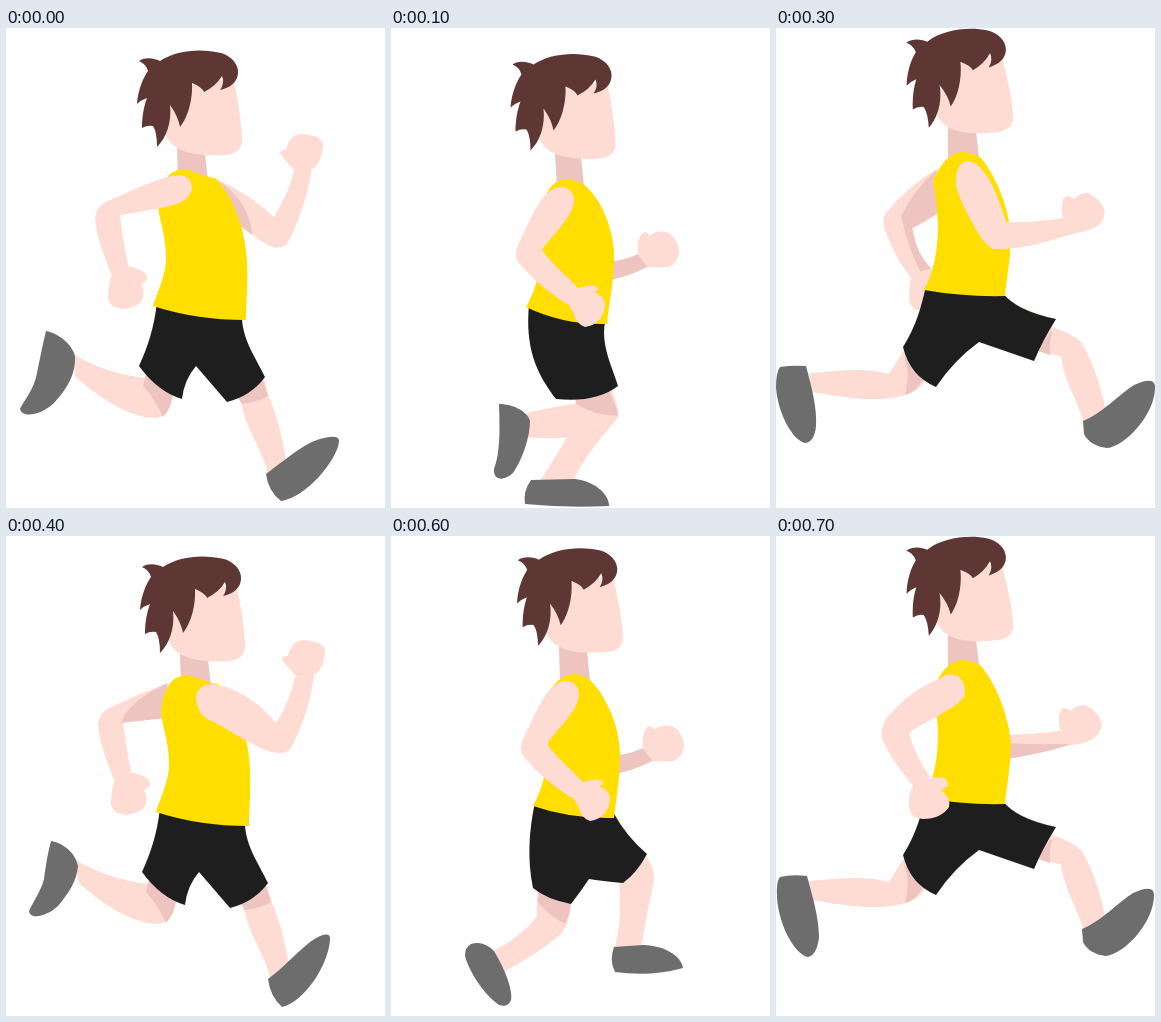
An HTML page that plays this animation: 379 by 480 pixels, repeating every 800 ms.

```html
<!DOCTYPE html>
<html lang="en">
<head>
<meta charset="utf-8">
<title>Runner</title>
<style>
html, body { margin: 0; width: 100%; height: 100%; overflow: hidden; background: #fff; }
svg { display: block; width: 100%; height: 100%; }
</style>
</head>
<body>
<svg id="stage" viewBox="0 0 379 480"></svg>
<script>
const SKIN = '#ffdcd3', SHADE = '#edc4bf', HAIR = '#5e3735',
      SHIRT = '#ffde00', SHORTS = '#1e1e1e', SHOE = '#6d6d6d';

const fill = (color, ...paths) => paths.map(d => `<path fill="${color}" d="${d}"/>`).join('');
const move = (x, y, parts, turn = 0) =>
  `<g transform="translate(${x} ${y}) rotate(${turn} 184 76)">${parts}</g>`;

const head =
  fill(SKIN, 'M164 60L160 108Q166 118 173 121Q188 129 220 127Q237 125 236 110Q235 85 227 50Z') +
  fill(HAIR, 'M133 33C140 28 150 31 154 33C170 22 195 20 215 25C228 29 235 40 231 50C228 57 222 60 214 62Q219 55 216 48Q210 58 198 64Q196 59 186 55C187 75 180 92 174 99Q172 88 164 77C166 95 160 110 151 119Q151 104 147 98Q141 97 136 100C136 88 138 78 141 70Q135 72 131 76C132 62 137 50 142 43Q140 36 133 33Z');

// The four steps of the stride: contact, passing, push-off, flight
const torsos = [
  fill(SHADE, 'M171 119L199 126L202 152L172 150Z') +
  fill(SHIRT, 'M163 147Q172 139 183 142Q200 149 209 150C225 165 240 200 241 235C242 260 240 275 240 292Q190 292 147 278C155 255 160 245 160 230C160 205 152 190 152 175Q154 158 163 147Z'),

  fill(SHADE, 'M164 125L190 129L193 158L166 160Z') +
  fill(SHIRT, 'M153 174Q158 151 178 151L191 155C205 165 220 190 223 222C224 250 218 275 216 296Q172 297 135 279C146 260 150 240 151 220Q152 190 153 174Z'),

  fill(SHADE, 'M168 110L196 115L199 145L169 146Z') +
  fill(SHIRT, 'M159 154Q170 138 184 138Q192 139 198 143C214 158 228 188 229 216C229 243 225 265 223 282Q180 283 142 270C153 250 157 228 157 207Q155 170 159 154Z'),

  fill(SHADE, 'M172 98L200 103L203 130L172 130Z') +
  fill(SHIRT, 'M160 147C168 130 178 124 188 124Q198 125 205 130C222 150 234 185 235 210C234 235 230 255 229 268Q188 269 148 262C160 240 162 215 162 195Q160 165 157 152Z')
];

const legs = [
  fill(SKIN, 'M67 326C90 340 115 347 139 350L140 346L168 362C166 378 163 388 150 390C125 390 95 372 69 348Z',
    'M234 372L258 350L262 366C270 385 277 410 280 433L262 447C258 425 240 400 236 378Z') +
  fill(SHADE, 'M140 346L168 362Q165 380 157 389C152 378 146 368 137 358Z', 'M236 376Q252 374 262 368L256 350L232 370Z') +
  fill(SHORTS, 'M151 274L236 286C235 310 250 330 259 349Q245 368 221 374L190 338Q178 352 176 371Q152 364 133 338C142 318 148 300 151 274Z'),

  fill(SKIN, 'M136 385Q160 379 190 375L200 400Q180 414 136 409Z',
    'M185 362L221 362Q229 383 227 389C213 407 195 425 182 453L149 453Q164 430 175 411L190 380Z') +
  fill(SHADE, 'M183 362L218 362Q226 380 227 388Q205 388 185 376Z') +
  fill(SHORTS, 'M138 276L215 290C208 315 222 340 227 358Q205 375 165 371C145 345 134 320 138 276Z'),

  fill(SKIN, 'M146 352L180 366Q180 385 170 398C150 415 128 428 108 438L96 418Q130 402 146 380Z',
    'M228 340L254 318Q266 335 262 350C256 375 254 392 250 412L224 412Q230 385 229 365Z') +
  fill(SHADE, 'M148 352L180 366Q179 378 174 388Q156 378 147 366Z') +
  fill(SHORTS, 'M144 266L222 276Q235 300 256 318Q246 337 232 347Q210 345 198 343Q190 355 180 368Q155 363 142 352C136 322 138 295 144 266Z'),

  fill(SKIN, 'M33 345C65 343 85 339 113 346Q120 335 128 322L150 352Q140 365 130 367C95 376 65 368 35 364Z',
    'M226 266Q242 281 280 291L276 299Q295 305 305 314C318 335 325 360 329 380L308 394C298 365 288 352 285 328Q276 327 262 322Z') +
  fill(SHADE, 'M128 328L148 350Q140 364 129 367Q133 352 131 338Z', 'M274 304L262 323L274 327Q273 314 276 304Z') +
  fill(SHORTS, 'M150 258L226 264Q240 283 280 291Q267 312 258 333L203 314Q178 332 160 359Q134 348 127 319C140 298 145 280 150 258Z')
];

const passShoes = y =>
  fill(SHOE, 'M140 452L184 451C202 453 218 465 218 478Q175 480 134 476Q132 463 140 452Z') +
  move(0, y, fill(SHOE, 'M108 376C120 376 136 382 139 393C139 410 131 432 122 445C112 454 102 452 103 441C109 425 109 405 108 376Z'));
const pushShoes = fill(SHOE,
  'M80 408Q92 404 103 415C112 430 122 452 120 464Q117 472 108 469C92 458 78 435 74 420Q74 411 80 408Z',
  'M223 411L252 409C275 410 290 420 292 432Q260 441 224 436Q218 424 223 411Z');
const flightFront = 'M307 393C325 386 345 365 358 357Q378 348 379 358C380 385 350 418 331 420Q314 418 308 406Z';

const shoes = [
  fill(SHOE, 'M260 446C278 433 300 413 318 410Q334 406 333 414C331 432 300 470 275 473Q262 463 260 446Z',
    'M40 303C52 305 66 316 69 328C70 345 62 360 48 375C34 388 16 390 14 381C18 372 28 362 31 345C34 330 37 315 40 303Z'),
  passShoes(0),
  pushShoes,
  fill(SHOE, flightFront, 'M4 339Q16 337 30 338C36 360 41 380 40 398C39 410 34 415 29 415C16 412 2 385 0 360Q0 344 4 339Z'),
  fill(SHOE, 'M262 443C280 430 298 408 312 401Q325 395 324 404C322 430 298 466 276 471Q264 460 262 443Z',
    'M45 305C58 307 70 318 72 330C71 345 62 358 52 370C40 381 24 384 23 375C27 366 35 355 38 343C40 328 42 316 45 305Z'),
  passShoes(-2),
  pushShoes,
  move(-1, 0, fill(SHOE, flightFront)) +
  fill(SHOE, 'M4 341Q16 338 31 340C37 362 43 382 43 402C41 416 36 421 31 421C17 416 3 388 1 362Q0 345 4 341Z')
];

const raisedHand = fill(SKIN, 'M289 143Q277 130 274 125Q275 121 280 122C283 108 292 104 302 107Q315 108 317 116C317 128 312 138 306 141Z');
const passHand = fill(SKIN, 'M247 225C246 212 249 205 254 204Q258 205 258 208Q266 202 276 204Q287 210 288 224Q287 236 277 239Q266 240 257 239Q250 232 247 225Z');
const flightHand = fill(SKIN, 'M287 190Q284 172 290 168Q295 168 298 171Q303 165 312 165Q326 172 329 184Q328 195 318 200Q310 204 298 205Z');
const backArm = fill(SKIN,
  'M172 147Q186 147 186 161C184 172 172 177 155 180C140 183 125 185 114 187C116 205 119 225 123 240L106 248C98 228 90 208 89 190Q90 178 102 173C125 163 150 150 172 147Z',
  'M106 246Q115 238 126 239Q140 243 141 249Q142 253 135 256C140 266 138 276 126 279C115 283 104 280 102 270Q102 255 106 246Z');

const farPassFront = fill(SHADE, 'M215 235Q240 230 247 226L258 238Q240 248 215 253Z') + passHand;
const nearPassBack = fill(SKIN,
  'M170 159Q183 160 183 174C180 192 160 208 151 222C160 235 178 250 188 261L176 276C155 263 135 245 126 232Q123 225 128 215C140 192 150 160 170 159Z',
  'M180 264Q185 260 195 258Q206 256 207 261Q206 264 203 264Q214 268 214 277Q212 296 194 299Q186 297 182 284Q176 275 176 272Z');
const farPassBack =
  fill(SKIN, 'M165 160C150 170 133 205 127 230Q130 245 148 255L160 220Z', 'M218 276Q226 283 222 293L216 298Z') +
  fill(SHADE, 'M160 190C150 200 140 215 135 225Q138 238 148 252L158 200Z');
const nearPassFront = move(1, 0, passHand) +
  fill(SKIN, 'M165 185Q165 161 183 160Q199 161 199 180C199 200 197 215 197 228Q225 230 249 223L261 240C235 250 205 257 185 258Q172 255 170 240Q165 210 165 185Z');

const farArms = [
  fill(SKIN, 'M208 150C235 162 255 177 268 189C278 172 286 155 288 141L306 139C303 165 292 195 281 216Q275 221 266 219C255 214 243 205 230 192Z') +
  fill(SHADE, 'M212 153C232 165 245 185 246 207L230 195Z') + raisedHand,
  farPassFront,
  move(4, -14, farPassBack),
  fill(SKIN, 'M162 140Q130 160 110 185Q105 192 110 205C118 225 127 240 135 250Q132 265 134 275Q138 284 147 282L158 245L150 240Q140 222 137 200Q150 195 164 183Z') +
  fill(SHADE, 'M160 142Q138 162 125 188Q133 225 148 250L155 240Q140 225 136 200L164 184Z') +
  fill(SKIN, 'M135 250Q144 240 160 241L150 275L136 276Z'),
  move(3, -2, backArm) + fill(SHADE, 'M161 147C140 158 122 168 115 187L160 182Z'),
  farPassBack,
  move(5, -14, farPassFront),
  fill(SKIN, 'M228 199Q260 198 284 195L298 207Q262 219 228 223Z') +
  fill(SHADE, 'M228 207Q265 209 296 208Q262 219 228 223Z') + move(-3, 4, flightHand)
];

const nearArms = [
  backArm,
  nearPassBack,
  move(4, -14, nearPassFront),
  fill(SKIN, 'M180 157Q179 134 192 133C208 134 222 165 230 194Q260 195 287 190L300 205C270 214 245 222 217 221Q207 216 197 196Q182 170 180 157Z') + flightHand,
  fill(SKIN, 'M190 160Q193 148 207 148C235 152 258 172 270 187C280 172 286 155 289 141L308 139C305 165 295 195 284 213Q278 219 266 216C250 212 225 195 208 186Q190 180 190 160Z') +
  move(2, -2, raisedHand),
  nearPassFront,
  move(5, -14, nearPassBack),
  fill(SKIN, 'M163 143Q172 136 182 140Q190 147 189 158Q186 166 175 172C160 182 145 188 133 197Q140 222 154 241L138 251C125 235 112 218 106 202Q104 193 110 183C125 165 143 150 163 143Z',
    'M138 248Q150 240 168 242Q173 246 172 250L165 254Q175 262 173 271Q165 283 147 283Q134 282 133 270Q132 258 138 248Z')
];

const bodyAt = [[0, 0], [0, 0], [0, 0], [0, 0], [3, -2], [2, 0], [0, 0], [0, 0]];
const headAt = [[0, 0, 0], [-11.5, 3.5, 0], [-5, -10, -1.5], [-0.5, -21, -3],
                [3, -2, 0], [-9.5, 3.5, 0], [-5, -10, -1.5], [-0.5, -21, -3]];

const poses = bodyAt.map(([x, y], i) => {
  const [hx, hy, turn] = headAt[i];
  return farArms[i] + move(x, y, legs[i % 4]) + shoes[i] +
    move(x, y, torsos[i % 4]) + nearArms[i] + move(hx, hy, head, turn);
});

const stage = document.getElementById('stage');
stage.innerHTML = poses.map(p => `<g display="none">${p}</g>`).join('');
const groups = [...stage.children];

function draw() {
  const now = Math.floor(performance.now() / 100) % poses.length;
  groups.forEach((g, i) => g.setAttribute('display', i === now ? 'inline' : 'none'));
  requestAnimationFrame(draw);
}
draw();
</script>
</body>
</html>
```
